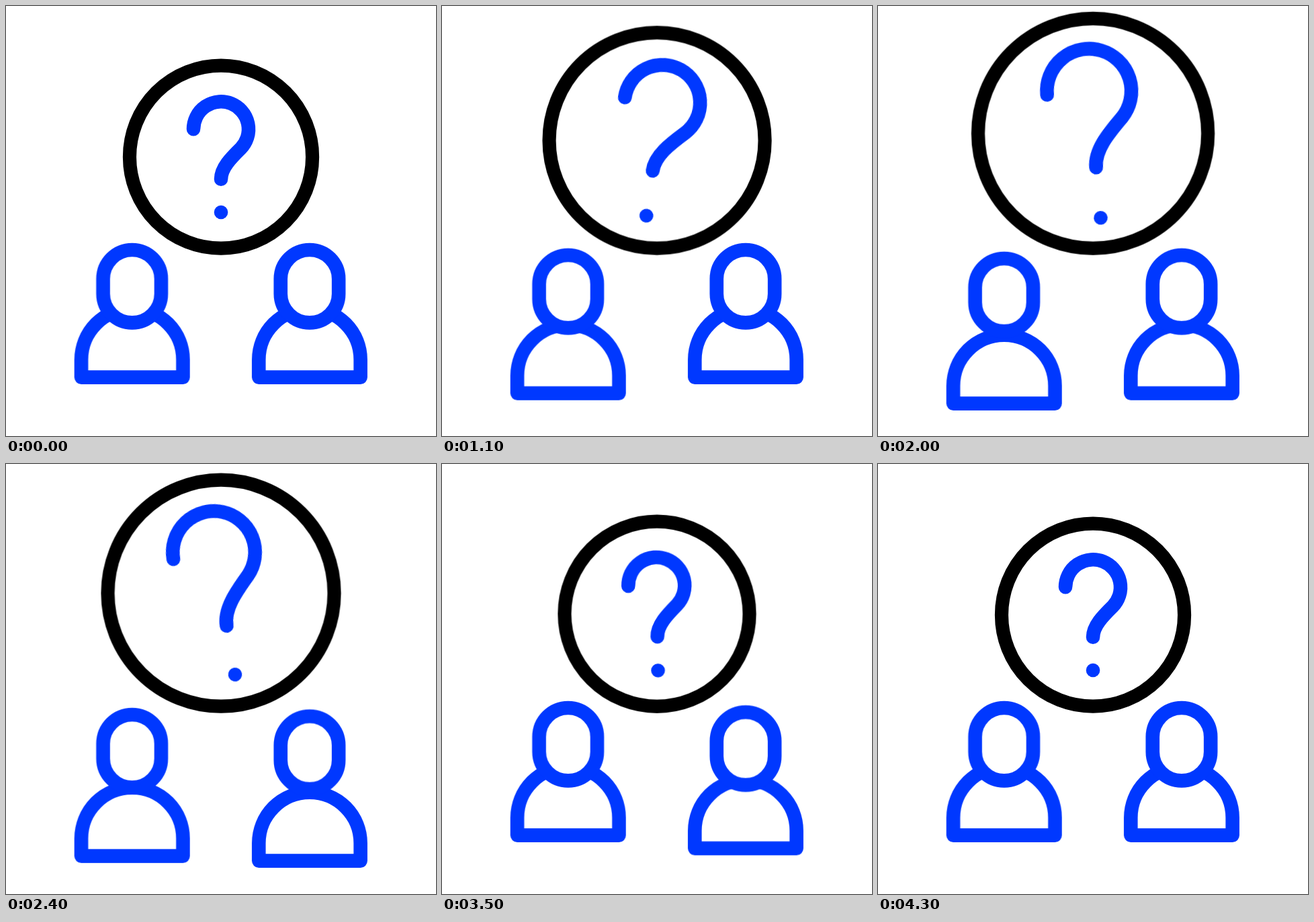
An HTML page for the animation above (4.4 s loop, 640 by 640 pixels).

```html
<!DOCTYPE html>
<html lang="en">
<head>
<meta charset="utf-8">
<title>Shared question</title>
<style>
  html, body { margin: 0; width: 100%; height: 100%; overflow: hidden; background: #fff; }
  svg { display: block; width: 100vw; height: 100vh; }

  path, circle, rect {
    fill: none;
    stroke: #0038ff;
    stroke-width: 20.6px;
    stroke-linecap: round;
    stroke-linejoin: round;
    vector-effect: non-scaling-stroke;
  }
  .head { fill: #fff; }

  .ring, .mark, .tilt, .head, .body {
    animation: 4.4s cubic-bezier(.63, 0, .37, 1) infinite;
  }
  .ring {
    stroke: #000;
    stroke-width: 20.2px;
    transform-origin: 320px 360.7px;
    animation-name: inflate;
  }
  .mark { transform-origin: 320px 224.65px; animation-name: grow; }
  .tilt { transform-origin: 320px 224.65px; animation-name: sway; }
  .head { --drop: 13px; animation-name: sink; }
  .body { --drop: 39.6px; animation-name: sink; }
  .late * { animation-delay: -3.5s; }

  @keyframes inflate {
    0%, 88.6%, 100% { transform: scale(1); }
    43.2% { transform: scale(1.258); }
  }
  @keyframes grow {
    0%, 88.6%, 100% { transform: translateY(0) scale(1); }
    43.2% { transform: translateY(-35.1px) scale(1.534); }
  }
  @keyframes sway {
    0%, 88.4%, 100% { transform: rotate(0deg); }
    27.3% { transform: rotate(8.1deg); }
    57.7% { transform: rotate(-10deg); }
  }
  @keyframes sink {
    0%, 6.82%, 77.05%, 100% { transform: translateY(0); }
    40.68%, 40.9% { transform: translateY(var(--drop)); }
  }
</style>
</head>
<body>
<svg viewBox="0 0 640 640">
  <circle class="ring" cx="320" cy="224.65" r="136.05"/>

  <g class="mark">
    <g class="tilt">
      <path d="M279 183.3A41 41 0 1 1 349.5 211.8C335 226 320 241 320 257.8"/>
      <path d="M320 307h.01"/>
    </g>
  </g>

  <g transform="translate(187.7 0)">
    <path class="body" d="M-75.7 552.6V526.4A75.7 75.7 0 0 1 75.7 526.4V552.6Z"/>
    <rect class="head" x="-43.2" y="363" width="86.4" height="108.4" rx="43.2"/>
  </g>
  <g class="late" transform="translate(451.9 0)">
    <path class="body" d="M-75.7 552.6V526.4A75.7 75.7 0 0 1 75.7 526.4V552.6Z"/>
    <rect class="head" x="-43.2" y="363" width="86.4" height="108.4" rx="43.2"/>
  </g>
</svg>
</body>
</html>
```
